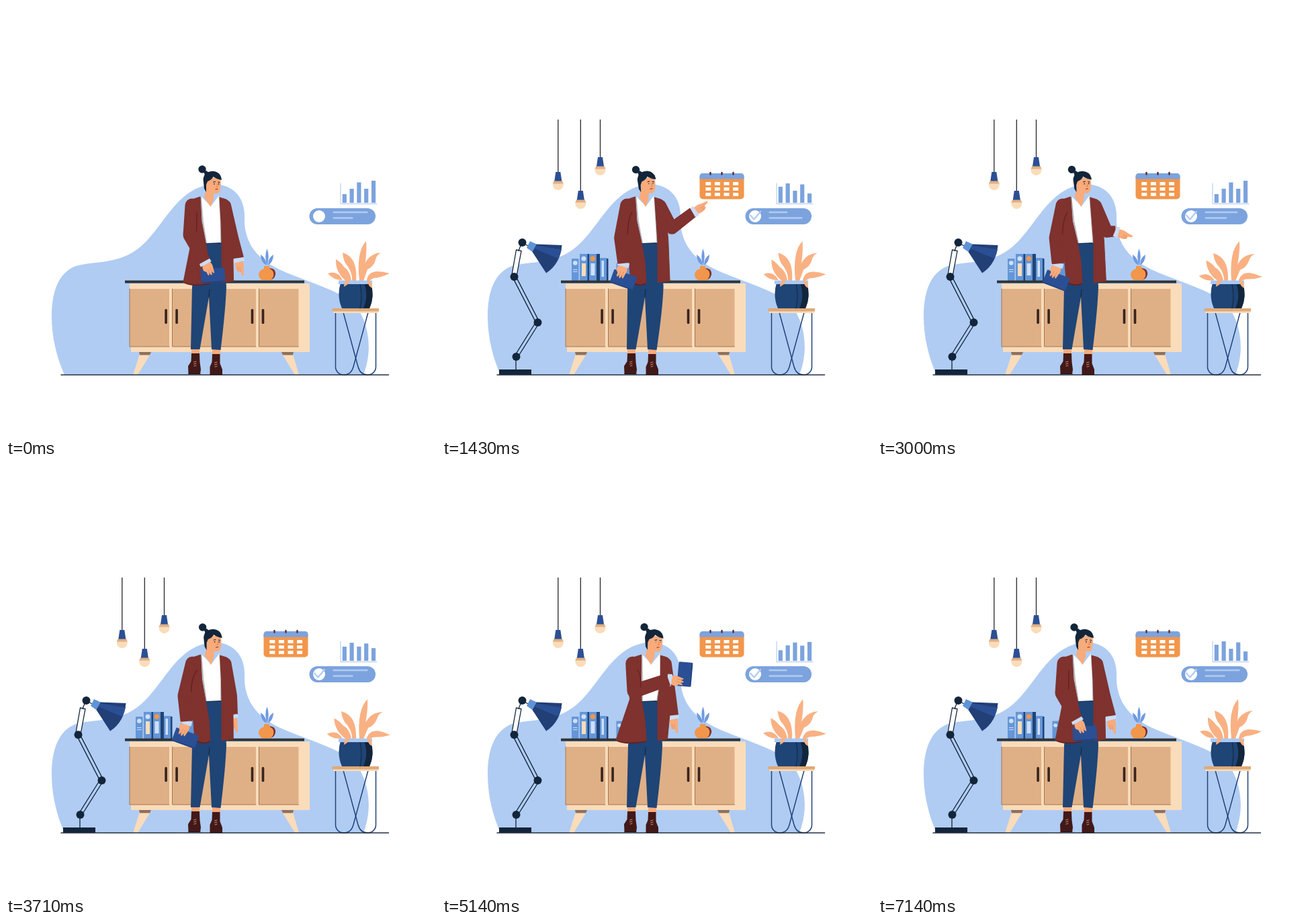
An HTML page that plays this animation: 640 by 640 pixels, repeating every 7210 ms.

```html
<!DOCTYPE html>
<html lang="en">
<head>
<meta charset="utf-8">
<title>Office assistant</title>
<style>
html, body { margin: 0; width: 100%; height: 100%; overflow: hidden; background: #fff; }
svg { display: block; width: 100%; height: 100%; }
.navy { fill: #1f4476; } .ink { fill: #12253a; } .blue { fill: #7ca3dd; } .sky { fill: #b0ccf3; }
.cream { fill: #fadcba; } .wood { fill: #dfb086; } .peach { fill: #f9b183; } .skin { fill: #f8ab7b; }
.coat { fill: #7f322e; stroke: #7f322e; stroke-linejoin: round; } .boot { fill: #421919; }
.orange { fill: #f2964b; } .tablet { fill: #2b4f94; } .cuff { fill: #cbdcf7; }
.line { fill: none; stroke-linecap: round; stroke-linejoin: round; }
</style>
</head>
<body>
<svg viewBox="0 0 640 640">
  <path class="sky" d="M87 549C75 522 68 492 68 462C68 425 78 397 104 387C138 378 174 386 208 351C238 321 258 267 312 265C345 268 356 292 355 315C354 346 368 371 399 388C432 406 488 419 515 441C536 460 549 505 532 549Z"/>
  <g id="lights"></g>

  <g id="deskLamp">
    <path class="line" stroke="#12253a" stroke-width="1.3" d="M110 541V522M108.300 520.500L140.300 469.500M112.500 523L144.500 472M140.300 472.100L105.300 404.100M144.700 469.900L109.700 401.900M119 352L130 358"/>
    <path fill="#fff" stroke="#12253a" stroke-width="1.3" d="M110.500 363L118 364.500L111 402L104 400Z"/>
    <path class="line" stroke="#12253a" stroke-width="1.3" d="M119 352L114 364"/>
    <path class="ink" d="M85 541H133V549H85Z"/>
    <g class="ink"><circle cx="110.500" cy="522" r="6"/><circle cx="142.500" cy="471" r="6"/><circle cx="107.500" cy="403" r="6"/><circle cx="119.500" cy="352" r="6"/></g>
    <path fill="#5f93d8" d="M131 350L142 355L136 367L126 360Z"/>
    <path fill="#223f76" d="M141 354.500L178.500 356Q176 384 155 397.500L134.500 366Z"/>
    <path class="tablet" d="M140 356.500L178 362.500Q176 370 173 376L137.500 361Z"/>
  </g>

  <g id="books">
    <path fill="#6496d8" d="M193 376H203.500V409H193ZM205 369H217V409H205ZM219 369H231V409H219ZM234 375H246V409H234Z"/>
    <path class="navy" d="M216.500 369H219V409H216.500ZM230 369H235V409H230ZM245 376H247.500V409H245Z"/>
    <path class="cream" d="M208 383H214V402H208Z"/>
    <path fill="#cfe0f8" d="M221.500 383H227.500V401H221.500ZM237.500 379H241V403H237.500ZM195 392H201.500V393H195ZM195 395H201.500V396H195Z"/>
    <g fill="#cfe0f8"><circle cx="198.300" cy="382.500" r="3.300"/><circle cx="211" cy="376" r="3.500"/></g>
    <circle class="orange" cx="224.500" cy="376" r="3.700"/>
    <path fill="#6496d8" d="M259.500 382.500H284V409H259.500Z"/><circle fill="#cfe0f8" cx="264" cy="389" r="2.800"/>
  </g>

  <path class="cream" d="M184 413H452V515H186V507H184Z"/>
  <g id="doors"></g>
  <path fill="#2f3438" d="M177 408.500H444V412.500H177Z"/>
  <path class="cream" d="M199 518H215L196 549H189ZM411 518H427L436 549H430Z"/>
  <path fill="#8d715f" d="M198 515H216L214 519.500H199ZM410 515H428L427 519.500H412Z"/>

  <path fill="#7f322e" d="M391 390Q402 390 401 400Q399 408 391 408Z"/>
  <path class="orange" d="M384 387H392Q391 391 396 393Q401 399 396 406L394 408H381Q376 405 376 399Q377 393 384 391Z"/>
  <path fill="#6f9ae0" d="M388.500 361Q393 373 388.500 386Q384 373 388.500 361ZM379 370Q387 375 387.500 386Q379 381 379 370ZM398 370Q398 381 390 386Q390 375 398 370Z"/>

  <g id="calendar">
    <rect class="orange" x="383.500" y="249" width="66" height="38.500" rx="5"/>
    <path class="blue" d="M383.500 257.500V254Q383.500 249 388.500 249H444.500Q449.500 249 449.500 254V257.500Z"/>
    <path class="line" stroke="#55292a" stroke-width="2.400" d="M399.500 248V250.500M416.500 248V250.500M433.500 248V250.500"/>
    <g id="days" fill="#fff"></g>
  </g>

  <path class="line" stroke="#a9c4ef" stroke-width="1" d="M498 264V294.500H552"/>
  <g id="bars" class="blue"></g>
  <rect class="blue" x="451.500" y="301" width="98.500" height="24" rx="12"/>
  <circle fill="#fff" cx="466" cy="313" r="9"/>
  <g class="line" stroke="#b0ccf3" stroke-width="2.300">
    <path id="check" pathLength="1" stroke-dasharray="1 2" d="M459 311.500L464.500 317.500L474 306"/>
    <path id="longLine"/><path id="shortLine"/>
  </g>

  <g class="line" stroke="#21437a" stroke-width="1.500">
    <path d="M490.500 456V537C490.500 544 496 549 503 549C510 549 515 544 517 537L539 456"/>
    <path d="M550.500 456V537C550.500 544 545 549 538 549C531 549 526 544 524 537L502 456"/>
  </g>
  <path class="cream" d="M487 454H554V457H487Z"/><path fill="#dfaa77" d="M485.500 450H555V454.500H485.500Z"/>
  <g id="leaves" class="peach"></g>
  <path class="navy" d="M498 412H543Q549 432 541 450H500Q492 432 498 412Z"/>
  <path class="ink" d="M533 412H543Q549 432 541 450H532Q540 432 533 412Z"/>
  <path class="line" stroke="#12253a" stroke-width="1" d="M527 413Q531 432 527 450"/>
  <path fill="#a9c8f3" d="M495 408.500H545V414H495Z"/>
  <path class="peach" d="M508 404Q516 411 503 418Q503 412 508 404ZM537 406Q545 408 545 420Q539 418 537 406Z"/>
  <path class="line" stroke="#232f42" stroke-width="1.500" d="M82 549H569.500"/>

  <g id="woman">
    <path id="armR" class="coat" stroke-width="2"/>
    <g id="handR">
      <path class="skin" d="M4-5C10-7 15-6 19-5L27-4.500V-2L20 0L21 3L17 5.500Q10 7 4 5Z"/>
      <path class="line" stroke="#e08a5e" stroke-width=".7" d="M14 0L20 0M14 3L19 3"/>
      <path class="cuff" d="M0-7.500L5-8.500L7 8L0 7.500Z"/>
    </g>
    <path class="skin" d="M276 509H288V518H276ZM307 510H319V519H307Z"/>
    <path class="boot" d="M276 517H288L288.500 530L290 541L289 548H271.500L271 536L275.500 529ZM307 518H318.500V532L322 541V549H303.500V537L306.500 530Z"/>
    <path class="line" stroke="#241010" stroke-width="1.200" d="M272 547.500H289M304 548.500H321.500"/>
    <path class="line" stroke="#f8ab7b" stroke-width=".8" d="M279.500 530L283 529M279.500 533L283 532M280 536L283 535M310.500 531L314 530M310.500 534L314 533M311 537L314 536"/>
    <path id="pants" class="navy"/>
    <path class="line" stroke="#12253a" stroke-width="1" d="M299 353H321M302 433L303 422"/>
    <path id="shirt" fill="#fff"/><path id="lapels" class="line" stroke="#b5b5b8" stroke-width="1.600"/>
    <path id="neck" class="skin"/>
    <path id="panels" class="coat" stroke-width="1"/>
    <path id="hem" class="line" stroke="#621f1f" stroke-width="1.500"/>
    <g id="head">
      <path class="skin" d="M299 255L319 256L320 265L319 273Q318 278 314.500 279L309 279L306 284L298 281L298 268Z"/>
      <circle class="skin" cx="299.500" cy="264.500" r="2.600"/>
      <path class="ink" d="M295 272L293.500 258Q295 246 308 245.800Q320 247 321 259Q314 258 308.500 254Q306 259 300 261L298 266V277Z"/>
      <circle class="ink" cx="292" cy="243" r="5.700"/><path class="ink" d="M294 246L298 245L303 249L296 252Z"/>
      <path class="line" stroke="#12253a" stroke-width="1" d="M308.500 262L311.500 261.500M315.500 262L318 262.500"/>
      <g id="eyes" class="ink"><circle cx="310" cy="264.800" r=".9"/><circle cx="316.500" cy="264.800" r=".9"/></g>
      <path class="line" stroke="#d9784f" stroke-width=".8" d="M314 264.500L315 269H313"/>
      <path class="line" stroke="#a83c32" stroke-width="1.200" d="M312 272.800L315 272.300"/>
    </g>
    <g id="tablet">
      <rect class="tablet" x="-18" y="-10.500" width="36" height="21" rx="1.500"/>
      <path class="line" stroke="#1f3d73" stroke-width="1" d="M-17 9.500H17"/>
    </g>
    <g id="handL">
      <path class="skin" d="M4-6Q10-9 15-7L23-5Q24-3 19-2.500L24-.5Q24 2 19 1.500L23 4Q22 6 17 5L13 8Q8 8 4 5Z"/>
      <path class="line" stroke="#e08a5e" stroke-width=".7" d="M14-3L20-2.500M14 1L20 1.500"/>
      <path class="cuff" d="M-1-8.500L6-9V9L-1 8.500Z"/>
    </g>
    <path id="armL" class="coat" stroke-width="2"/>
    <path id="crease" class="line" stroke="#621f1f" stroke-width="1.200"/>
  </g>
</svg>
<script>
const LOOP = 7210, CYCLE = 7140;
const $ = id => document.getElementById(id);
const set = (id, name, value) => $(id).setAttribute(name, value);
const path = (id, d) => set(id, 'd', d);
const clamp = v => Math.min(1, Math.max(0, v));
const mix = (a, b, u) => a + (b - a) * u;
const cubic = u => u < .5 ? 4 * u ** 3 : 1 - 4 * (1 - u) ** 3;
const smooth = u => u * u * (3 - 2 * u);
const backOut = u => 1 + 2.7 * (u - 1) ** 3 + 1.7 * (u - 1) ** 2;
const span = (t, start, length) => clamp((t - start) / length);
// Eased back-and-forth between 0 and 1
const swing = (t, half) => {
  const p = t / half % 2;
  return cubic(p < 1 ? p : 2 - p);
};

const lights = [[172.8, 247, 620], [206.3, 275, 340], [235.5, 225, 480]];
$('lights').innerHTML = lights.map(([x, y]) => `<g>
  <path d="M${x} 169V${y}" stroke="#24272d" stroke-width="1.300"/>
  <circle class="cream" cx="${x}" cy="${y + 19}" r="8"/>
  <path class="wood" d="M${x - 6} ${y + 13}h12l2 4.500h-16z"/>
  <path class="tablet" d="M${x - 3.5} ${y}h7l2 13.500h-11z"/></g>`).join('');

$('doors').innerHTML = [[184, 59], [247.5, 59], [312, 60], [376.5, 59]].map(([x, w]) =>
  `<path class="wood" d="M${x} 421h${w}v86h${-w}z"/>
   <path class="line" stroke="#a5764f" stroke-width="1" d="M${x} 421v86h${w}"/>`).join('') +
  [236.3, 252.3, 364.7, 380.7].map(x => `<rect fill="#38241f" x="${x}" y="451" width="3.600" height="22" rx="1.500"/>`).join('');

for (let i = 0; i < 12; i++)
  $('days').innerHTML += `<rect x="${392.3 + i % 4 * 13.6}" y="${262 + Math.floor(i / 4) * 8}" width="8" height="4.800"/>`;

const bars = [[280, 269], [272, 264], [262.5, 275], [272, 265.5], [260, 279]];
$('bars').innerHTML = bars.map((_, i) => `<rect x="${500.7 + i * 10.8}" width="6.200"/>`).join('');

// Each leaf: base, sway in degrees, outline
const leaves = [
  [502, 408, -9, 'M479 398Q494 393 501 408Q487 408 479 398Z'],
  [508, 408, -5, 'M491 377Q507 386 511 410H507Q490 397 491 377Z'],
  [518, 408, -3, 'M501 367Q524 374 521 409H515Q516 399 509 388Q502 381 501 367ZM500 387Q512 392 514 409H510Q508 396 500 387Z'],
  [527, 408, 2, 'M536 350Q538 372 530 409H526Q521 365 536 350Z'],
  [530, 408, 4, 'M558 367Q551 371 550 378Q547 388 538 392L532 409H528Q531 369 558 367Z'],
  [538, 408, 9, 'M571 398Q559 404 547 405L537 411Q537 396 552 395Q561 395 571 398Z']
];
$('leaves').innerHTML = leaves.map(l => `<path d="${l[3]}"/>`).join('');

// time, lean, head angle, eye openness, hip width, left hem,
// left elbow, wrist, hand angle, tablet x, y, angle, right elbow, wrist, hand angle
const poses = [
  [0, 0, 0, 1, 0, 264, 274, 341, 295, 379, 62, 308, 401, -4, 337, 345, 346, 375, 82],
  [710, .018, -2, .3, 3, 282, 269, 345, 274, 381, 100, 276, 406, 17, 338, 336, 375, 322, -15],
  [2210, -.045, -4, 1, 0, 280, 264, 345, 267, 383, 112, 263, 409, 22, 347, 325, 371, 291, -46],
  [3710, .005, 0, 1, 0, 281, 266, 345, 269, 382, 110, 267, 408, 20, 335, 345, 337, 373, 82],
  [5140, .06, 2, .3, 0, 259, 286, 338, 336, 321, 8, 361.500, 313, -85, 339, 343, 344, 374, 84],
  [5930, .03, 3, 1, 0, 276, 265, 345, 266, 381, 115, 259, 406, 27, 337, 345, 345, 375, 82]
];
poses.push([CYCLE, ...poses[0].slice(1)]);

function poseAt(t) {
  const i = poses.findIndex(p => p[0] > t);
  if (i < 0) return poses[0];
  const a = poses[i - 1], b = poses[i];
  const u = smooth((t - a[0]) / (b[0] - a[0]));
  return a.map((v, k) => mix(v, b[k], u));
}

function limb([x, y, r], [x2, y2, r2]) {
  const length = Math.hypot(x2 - x, y2 - y), nx = (y - y2) / length, ny = (x2 - x) / length;
  return `M${x + nx * r} ${y + ny * r}L${x2 + nx * r2} ${y2 + ny * r2}L${x2 - nx * r2} ${y2 - ny * r2}L${x - nx * r} ${y - ny * r}Z`;
}
const disc = ([x, y, r]) => `M${x - r} ${y}a${r} ${r} 0 1 0 ${2 * r} 0a${r} ${r} 0 1 0 ${-2 * r} 0Z`;
const sleeve = (s, e, w) => disc(s) + limb(s, e) + disc(e) + limb(e, w);
const place = (id, x, y, angle) => set(id, 'transform', `translate(${x} ${y}) rotate(${angle})`);

function drawWoman(t) {
  const [, lean, headAngle, open, hip, hem, lex, ley, lwx, lwy, la, tx, ty, ta, rex, rey, rwx, rwy, ra] = poseAt(t);
  const at = (x, y) => `${x + (410 - y) * lean} ${y} `;
  const sL = [277 + 113 * lean, 297, 9.5], sR = [326 + 113 * lean, 297, 8];

  path('armR', sleeve(sR, [rex, rey, 8], [rwx, rwy, 7]));
  place('handR', rwx, rwy, ra);
  path('pants', `M298 350H322L${326 + hip} 385L${328 + hip} 418Q${327 + hip} 450 319.500 512L306 511L302 433L288.500 511H275L${277 - hip / 2} 418L284 384Z`);
  path('shirt', `M${at(290, 283)}L${at(305, 298)}L${at(317, 282)}L${at(320, 320)}L320 352L298 353L${at(292, 320)}Z`);
  path('lapels', `M${at(290, 284)}L${at(293, 320)}L298 352M${at(317.5, 284)}L${at(319.5, 320)}L320 352`);
  path('neck', `M${at(297, 276)}L${at(309, 277)}L${at(309, 287)}L${at(304.5, 299)}L${at(295, 285)}Z`);
  path('panels', `M${at(289, 284)}L${at(274, 289)}Q${at(267, 294)}${at(268, 305)}L${at(276, 350)}L${hem} 411Q${hem + 15} 418 304 413L302 380L297 352L${at(291, 320)}Z` +
    `M${at(318, 285)}L${at(328, 288)}Q${at(332, 291)}${at(334, 300)}L${at(337.5, 350)}L${338.5 - 50 * lean} 409.500L321 411.500L321 352L${at(320, 320)}Z`);
  path('hem', `M${hem + 2} 412Q${hem + 15} 418 303 413`);
  set('head', 'transform', `translate(${128 * lean} 0) rotate(${headAngle} 303 282)`);
  set('eyes', 'transform', `translate(0 264.800) scale(1 ${open}) translate(0 -264.800)`);
  place('tablet', tx, ty, ta);
  place('handL', lwx, lwy, la);
  path('armL', sleeve(sL, [lex, ley, 9.5], [lwx, lwy, 8.5]));
  path('crease', `M${sL[0] + 7} 307Q${lex + 10} ${ley - 28} ${lex + 9.5} ${ley - 6}`);
}

function drawIntro(t) {
  lights.forEach(([x, , start], i) => {
    const s = cubic(span(t, start, 700));
    $('lights').children[i].setAttribute('transform', `translate(${x} 169) scale(${s}) translate(${-x} -169)`);
  });
  const lamp = span(t, 40, 850);
  set('deskLamp', 'transform', `translate(${-34 * (1 - lamp) ** 2.3} 0)`);
  set('deskLamp', 'opacity', clamp(lamp * 3));
  const pop = t < 150 ? 0 : backOut(span(t, 150, 850));
  set('books', 'transform', `translate(220 409) scale(${Math.max(0, pop)}) translate(-220 -409)`);
  const drop = span(t, 290, 700);
  set('calendar', 'transform', `translate(0 ${-40 * (1 - cubic(drop))})`);
  set('calendar', 'opacity', clamp(drop * 2.5));
  const drawn = smooth(span(t, 100, 500));
  set('check', 'stroke-dashoffset', 1 - drawn);
  set('check', 'opacity', drawn > 0 ? 1 : 0);
}

function drawPanel(t) {
  const level = swing(t, CYCLE / 5);
  bars.forEach(([low, high], i) => {
    const y = mix(low, high, level), bar = $('bars').children[i];
    bar.setAttribute('y', y);
    bar.setAttribute('height', 293 - y);
  });
  const shift = swing(t, CYCLE / 4);
  path('longLine', `M487.500 307H${mix(537.5, 512.5, shift)}`);
  path('shortLine', `M487.500 315.500H${mix(515.5, 536, shift)}`);
  const sway = swing(t, CYCLE / 2);
  leaves.forEach(([x, y, angle], i) =>
    $('leaves').children[i].setAttribute('transform', `rotate(${angle * sway} ${x} ${y})`));
}

const began = performance.now();
function frame() {
  const t = Math.max(0, performance.now() - began) % LOOP;
  drawIntro(t);
  drawPanel(t);
  drawWoman(t);
  requestAnimationFrame(frame);
}
frame();
</script>
</body>
</html>
```
